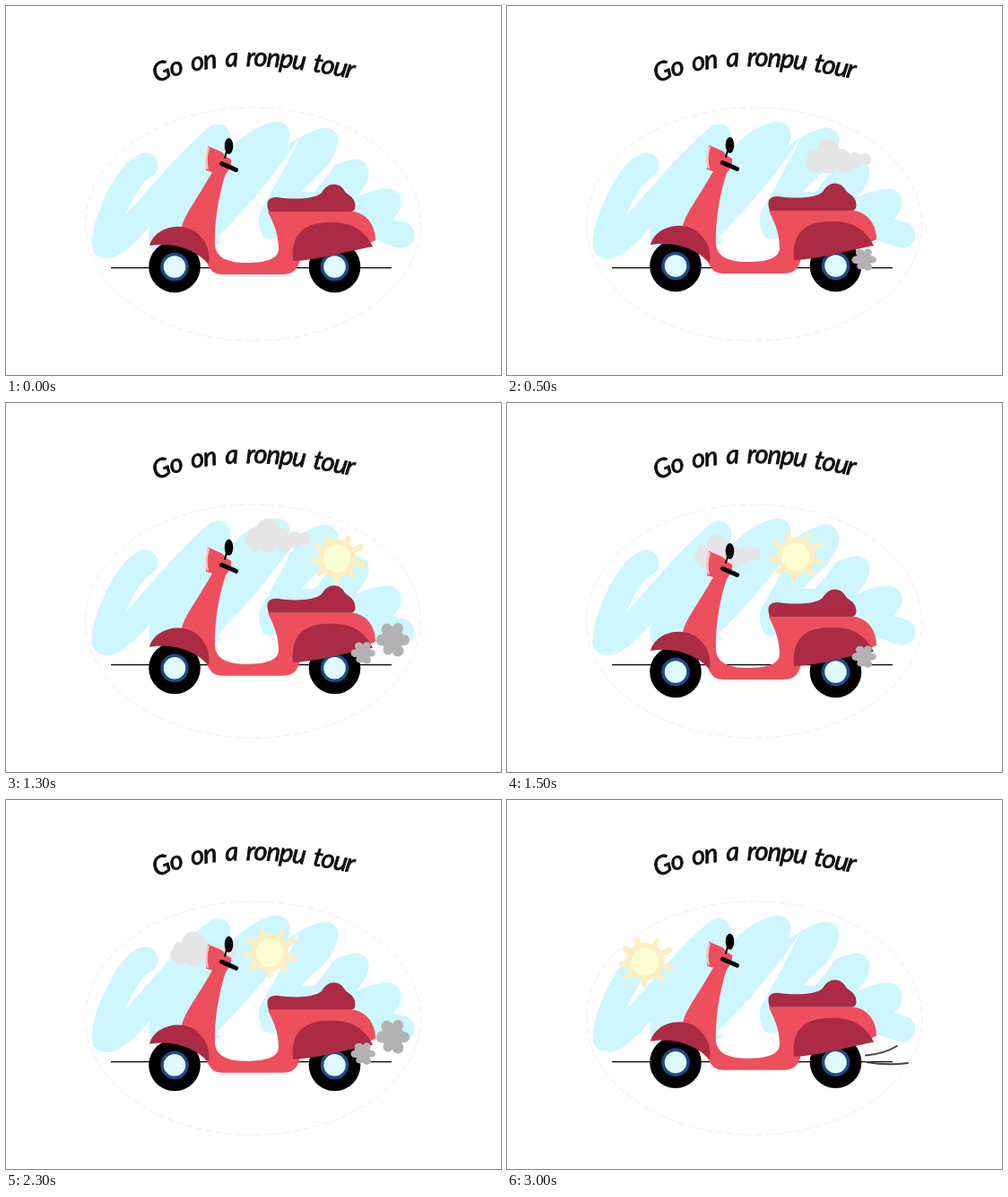
Recreate the animation shown at these times as an HTML page without scripts. Size 552 by 411 pixels, loop 3500 ms.

```html
<!DOCTYPE html>
<html lang="en">
<head>
<meta charset="utf-8">
<title>Scooter tour</title>
<style>
  html, body { margin: 0; width: 100%; height: 100%; overflow: hidden; background: #fff; }
  svg { display: block; width: 100vw; height: 100vh; }
  .caption { font: italic 29px Lato, "Open Sans", sans-serif; letter-spacing: -1.2px; word-spacing: 4px; fill: #111; stroke: #111; stroke-width: .9; }
  .line { fill: none; stroke-linecap: round; stroke-linejoin: round; }
  .sky { stroke: #cdf6ff; stroke-width: 29; }
  .red { fill: #ed4f5d; }
  .wine { fill: #ab2b44; }
  .cloud { fill: #e5e5e5; }
  .smoke { fill: #b2b2b2; }
  .speed { stroke: #444; stroke-width: 2; }
</style>
</head>
<body>
<svg viewBox="0 0 552 411" xmlns="http://www.w3.org/2000/svg">
  <defs>
    <path id="arc" d="M168 86C197 72 236 66 281 67S352 75 410 85"/>
    <g id="wheel">
      <circle r="28.8"/>
      <circle r="14" fill="#e0fbff" stroke="#204a87" stroke-width="3.5"/>
    </g>
    <g id="puff">
      <circle r="13"/>
      <circle cx="-12" cy="1" r="6.5"/>
      <circle cx="-6" cy="-11" r="6.5"/>
      <circle cx="6" cy="-12" r="6"/>
      <circle cx="13" cy="1" r="6"/>
      <circle cx="6" cy="13" r="6.5"/>
      <circle cx="-5" cy="12" r="5.5"/>
    </g>
  </defs>

  <ellipse cx="275.5" cy="243" rx="187" ry="130" fill="none" stroke="#efefef" stroke-dasharray="7 4"/>

  <text class="caption"><textPath href="#arc">Go on a ronpu tour</textPath></text>

  <path class="line sky" d="M155 178C134 187 110 242 110 266
    C128 274 182 190 236 146C234 170 163 240 175 262
    C200 262 250 152 302 143C304 165 212 240 224 256
    C255 240 310 160 356 150C355 172 289 227 295 245
    C312 242 352 191 390 185C390 203 342 225 350 243
    C372 243 398 219 426 218C427 230 400 235 410 245C420 247 428 252 441 255"/>
  <path fill="#fff" d="M236 257Q285 210 328 146Q303 196 283 230Q279 245 290 262H236Z
    M330 207Q352 182 370 173Q358 190 344 207Z"/>

  <path d="M117 291.6H430" stroke="#000" stroke-width="1.4"/>

  <g class="cloud" visibility="hidden">
    <circle cx="27" cy="13" r="12.5"/>
    <circle cx="12" cy="20" r="8"/>
    <circle cx="7" cy="26" r="6"/>
    <circle cx="12" cy="31" r="7"/>
    <circle cx="27" cy="29" r="10"/>
    <circle cx="42" cy="21" r="10"/>
    <circle cx="46" cy="29" r="9"/>
    <circle cx="57" cy="24" r="9"/>
    <circle cx="68" cy="23" r="7"/>
    <animate attributeName="visibility" calcMode="discrete" dur="3.5s" repeatCount="indefinite"
      values="hidden;visible;visible;visible;visible;visible;hidden"/>
    <animateTransform attributeName="transform" type="translate" calcMode="discrete" dur="3.5s" repeatCount="indefinite"
      values="331 148;331 148;265 128;208 146;182 146;138 140;138 140"/>
  </g>

  <g visibility="hidden">
    <circle r="21" fill="#fdeec2"/>
    <path class="line" stroke="#fdeec2" stroke-width="6.5"
      d="M0 0-9-23M0 0 13-22M0 0 27-13M0 0 28 7M0 0 18 19M0 0-1 25M0 0-20 17M0 0-26 3M0 0-22-14"/>
    <circle r="15.5" fill="#fafed0"/>
    <animate attributeName="visibility" calcMode="discrete" dur="3.5s" repeatCount="indefinite"
      values="hidden;hidden;visible;visible;visible;visible;visible"/>
    <animateTransform attributeName="transform" type="translate" calcMode="discrete" dur="3.5s" repeatCount="indefinite"
      values="369 173;369 173;369 173;322 171;294 170;255 179;154 180"/>
  </g>

  <g>
    <use href="#wheel" x="188" y="290.5"/>
    <use href="#wheel" x="366.5" y="290.5"/>
    <path class="red" d="M225 156L237 161Q243 163 244 167L251 171Q252 179 245 187
      C238 207 232 240 233 266C234 281 248 286 268 286C290 286 304 282 304 270
      C303 252 300 246 292 229H388C404 232 412 246 412 261L405 264
      L328 282C325 294 320 299 308 299H242C232 299 228 295 224 286L195 256
      C195 236 206 227 230 185L223 183Z"/>
    <path d="M225 157Q220 170 224 182L226 182Q223 170 227 158Z" fill="#f8c3c3"/>
    <path class="wine" d="M160 267C165 247 194 239 212 252C224 262 228 274 226 287C212 273 190 262 160 267Z"/>
    <path class="wine" d="M320 284C317 252 334 240 365 241C390 241 403 255 409 268C385 272 350 283 320 284Z"/>
    <path class="wine" d="M293 229C289 217 293 213 302 213C322 216 345 215 352 208C358 197 370 195 377 205C379 210 387 211 389 219Q391 228 385 229Z"/>
    <ellipse cx="248.5" cy="156" rx="4.8" ry="9"/>
    <path class="line" stroke="#000" stroke-width="2" d="M246 162L244 169"/>
    <path class="line" stroke="#000" stroke-width="5" d="M240.500 175.500L256.500 182.500"/>
    <animateTransform attributeName="transform" type="translate" calcMode="discrete" dur="3.5s" repeatCount="indefinite"
      values="0 0;0 -1;0 4.800;0 9;0 4.800;0 -1;0 1.700"/>
  </g>

  <g class="smoke" visibility="hidden">
    <use href="#puff" transform="scale(.73 .65)"/>
    <animate attributeName="visibility" calcMode="discrete" dur="3.5s" repeatCount="indefinite"
      values="hidden;visible;visible;visible;visible;hidden;hidden"/>
    <animateTransform attributeName="transform" type="translate" calcMode="discrete" dur="3.5s" repeatCount="indefinite"
      values="398 282;398 282;398 278;398 282;398 282;398 282;398 282"/>
  </g>
  <g class="smoke" visibility="hidden">
    <use href="#puff" x="431" y="263"/>
    <animate attributeName="visibility" calcMode="discrete" dur="3.5s" repeatCount="indefinite"
      values="hidden;hidden;visible;hidden;visible;hidden;hidden"/>
  </g>

  <path class="line speed" visibility="hidden" d="M400 291Q411 291 419 283M399 300Q413 303 427 301.500">
    <animate attributeName="visibility" calcMode="discrete" dur="3.5s" repeatCount="indefinite"
      values="hidden;hidden;hidden;hidden;hidden;visible;hidden"/>
  </path>
  <path class="line speed" visibility="hidden" d="M400 284.500Q420 283 435 274M401 292Q424 296 447 293">
    <animate attributeName="visibility" calcMode="discrete" dur="3.5s" repeatCount="indefinite"
      values="hidden;hidden;hidden;hidden;hidden;hidden;visible"/>
  </path>
</svg>
</body>
</html>
```
